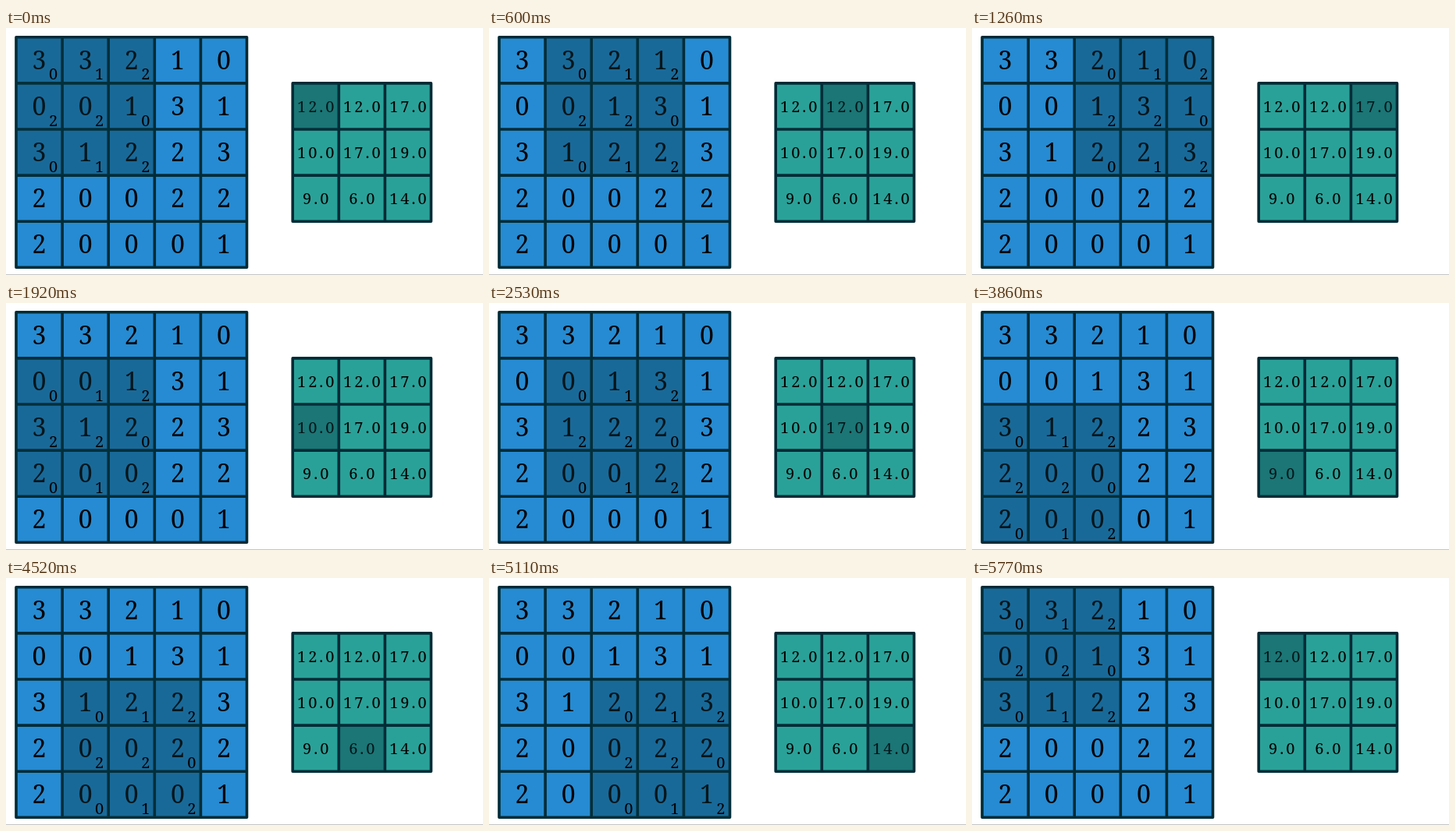
Animation, 611 px wide and 317 px high, one loop 5840 ms. Source, as an HTML page with a canvas:

```html
<!DOCTYPE html>
<html lang="en">
<head>
<meta charset="utf-8">
<title>Convolution</title>
<style>
  html, body { margin: 0; width: 100%; height: 100%; overflow: hidden; background: #fff; }
  canvas { display: block; }
</style>
</head>
<body>
<canvas id="stage" width="611" height="317"></canvas>
<script>
const ctx = document.getElementById('stage').getContext('2d');
const CELL = 59.1;
const LOOP = 5840;
const stepTimes = [0, 600, 1260, 1920, 2530, 3190, 3860, 4520, 5110, 5770];

const input = ['33210', '00131', '31223', '20022', '20001'].map(row => [...row].map(Number));
const kernel = ['012', '220', '012'].map(row => [...row].map(Number));

// Each output value is the kernel applied at that offset.
const convolve = (row, col) => kernel.reduce((sum, line, r) =>
  sum + line.reduce((part, k, c) => part + k * input[row + r][col + c], 0), 0);
const output = kernel.map((line, r) => line.map((_, c) => convolve(r, c).toFixed(1)));

const inputGrid = { x: 13, y: 11.8, values: input, color: '#268bd2', size: 32, spacing: 0 };
const outputGrid = { x: 367.2, y: 70.9, values: output, color: '#2aa198', size: 20, spacing: 3 };

function drawText(text, x, y, size, spacing = 0) {
  ctx.font = `${size}px "Noto Serif", serif`;
  ctx.letterSpacing = `${spacing}px`;
  ctx.fillStyle = '#000';
  ctx.textAlign = 'center';
  ctx.fillText(text, x + spacing / 2, y + size * 0.357);
}

function drawGrid({ x, y, values, color, size, spacing }) {
  const count = values.length;
  const side = count * CELL;
  ctx.fillStyle = color;
  ctx.fillRect(x, y, side, side);
  ctx.strokeStyle = '#002b36';
  ctx.lineWidth = 3.6;
  ctx.lineJoin = 'round';
  ctx.beginPath();
  ctx.rect(x, y, side, side);
  for (let i = 1; i < count; i++) {
    const d = i * CELL;
    ctx.moveTo(x + d, y);
    ctx.lineTo(x + d, y + side);
    ctx.moveTo(x, y + d);
    ctx.lineTo(x + side, y + d);
  }
  ctx.stroke();
  values.forEach((line, r) => line.forEach((value, c) =>
    drawText(value, x + (c + 0.5) * CELL, y + (r + 0.5) * CELL, size, spacing)));
}

function shade(grid, row, col, count) {
  ctx.fillStyle = 'rgba(7, 54, 66, 0.4)';
  ctx.fillRect(grid.x + col * CELL, grid.y + row * CELL, count * CELL, count * CELL);
}

function draw(time) {
  const step = stepTimes.findLastIndex(start => start <= time) % 9;
  const row = Math.floor(step / 3);
  const col = step % 3;

  ctx.fillStyle = '#fff';
  ctx.fillRect(0, 0, 611, 317);
  ctx.fillStyle = '#c4c4c4';
  ctx.fillRect(0, 316, 611, 1);

  drawGrid(inputGrid);
  drawGrid(outputGrid);
  shade(inputGrid, row, col, 3);
  shade(outputGrid, row, col, 1);

  kernel.forEach((line, r) => line.forEach((weight, c) => drawText(
    weight,
    inputGrid.x + (col + c + 0.5) * CELL + 18,
    inputGrid.y + (row + r + 0.5) * CELL + 18,
    20)));
}

const startTime = performance.now();
function tick() {
  draw((performance.now() - startTime) % LOOP);
  requestAnimationFrame(tick);
}
tick();
</script>
</body>
</html>
```
